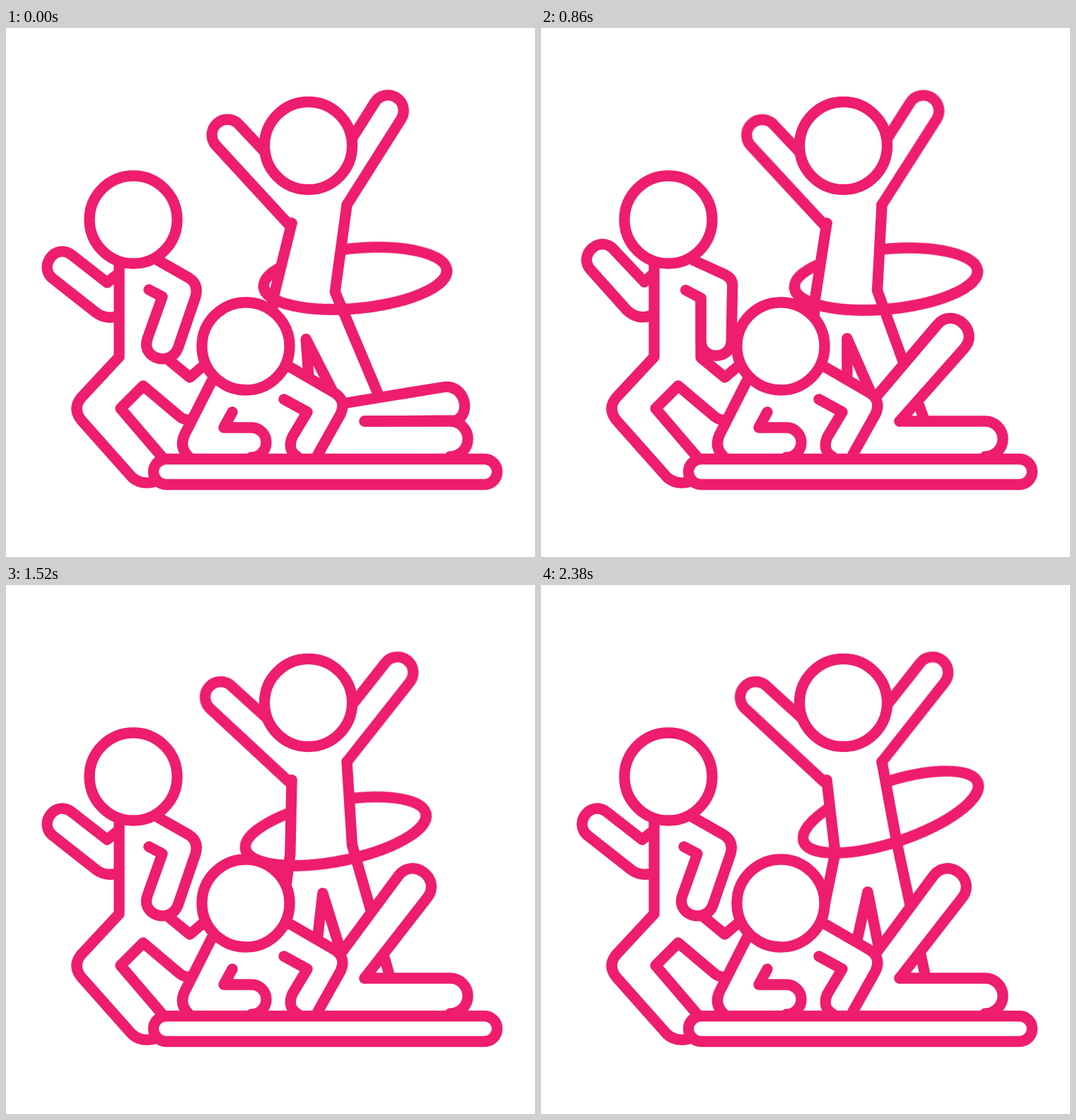
These frames come from a looping animation (748 px wide and 748 px high, 2580 ms). An HTML page without scripts:

```html
<!DOCTYPE html>
<html lang="en">
<head>
<meta charset="utf-8">
<title>Exercise group</title>
<style>
html, body { margin: 0; width: 100%; height: 100%; overflow: hidden; background: #fff; }
svg { display: block; width: 100vw; height: 100vh; }
.line { fill: none; }
.mask { fill: #fff; stroke: none; }
.solid { fill: #fff; }
.move { animation: 2580ms linear infinite; }

.torso { animation-name: torso; }
.hips { animation-name: hips; }
.hoop { animation-name: hoop; }
.arm-left { animation-name: arm-left; transform-origin: 403px 277px; }
.arm-right { animation-name: arm-right; transform-origin: 482px 250px; }
.run-back { animation-name: run-back; }
.run-front { animation-name: run-front; }
.shin { animation-name: shin; }

/* hoop dancer: waist sways, shoulders and feet stay put */
@keyframes torso {
  0%, 31.7% { d: path("M404 276L377 385L465 373L482 250"); }
  11.2%, 40.3% { d: path("M404 276L431 374L519 363L482 250"); }
  51.5% { d: path("M404 276L392 382L480 370L482 250"); animation-timing-function: cubic-bezier(.2, .5, .5, 1); }
  90%, 100% { d: path("M404 276L416 379L503 364L482 250"); }
}
@keyframes hips {
  0%, 31.7% { d: path("M404 276L377 385L378 565M482 250L465 373L546 565M433 565L424 440L488 565"); }
  11.2%, 40.3% { d: path("M404 276L431 374L378 565M482 250L519 363L546 565M433 565L469 434L488 565"); }
  51.5% { d: path("M404 276L392 382L378 565M482 250L480 370L546 565M433 565L438 437L488 565"); animation-timing-function: cubic-bezier(.2, .5, .5, 1); }
  90%, 100% { d: path("M404 276L416 379L378 565M482 250L503 364L546 565M433 565L462 434L488 565"); }
}
@keyframes hoop {
  0%, 32.6% { transform: translate(494px, 354px) rotate(-5.3deg); }
  15.8%, 40.3% { transform: translate(433px, 364.5px) rotate(-5.5deg); }
  51.2% { transform: translate(438.5px, 363px) rotate(-8deg); }
  62.8% { transform: translate(480px, 341px) rotate(-12.5deg); }
  67.4% { transform: translate(486px, 333.5px) rotate(-14.5deg); }
  81.4% { transform: translate(493.5px, 320px) rotate(-18.4deg); }
  92.2%, 100% { transform: translate(494.5px, 321px) rotate(-18.6deg); }
}
@keyframes arm-left {
  0%, 34.1% { transform: none; }
  17.05%, 51.2%, 100% { transform: rotate(-4.5deg); }
}
@keyframes arm-right {
  0%, 34.1% { transform: none; }
  17.05%, 51.2%, 100% { transform: rotate(6deg); }
}

/* runner */
@keyframes run-back {
  0%, 49.6%, 100% { d: path("M158 348L143 360L93 321C70 303 44 338 67 355L128 403Q140 412 157 408"); }
  24.8% { d: path("M158 348L148 359L108 309C91 286 55 311 72 335L117 396Q135 415 157 405"); }
}
@keyframes run-front {
  0%, 49.6%, 100% { d: path("M202 370L221 380L200 439C190 467 232 480 243 453L268 380Q273 362 258 353L214 328"); }
  24.8% { d: path("M206 371L229 383L240 444C245 472 288 465 283 437L272 362Q272 351 262 347L213 327"); }
}

/* leg of the person on the mat */
@keyframes shin {
  0%, .8%, 39.9%, 42.2% { d: path("M476 531L617 508C649 502 659 546 636 555L507 556"); }
  9.3%, 32.75%, 53.5%, 100% { d: path("M475 519L555 411C576 384 617 416 595 443L507 556"); }
  51.2% { d: path("M475 519L551 414C571 387 612 417 592 445L507 556"); }
}
</style>
</head>
<body>
<svg viewBox="0 0 748 748" stroke="#ee1d6e" stroke-width="15.3" stroke-linecap="round" stroke-linejoin="round">
  <g id="dancer">
    <g class="hoop move"><ellipse class="line" rx="130" ry="42.5"/></g>
    <path class="mask torso move" d="M404 276L377 385L465 373L482 250"/>
    <path class="line hips move" d="M404 276L377 385L378 565M482 250L465 373L546 565M433 565L424 440L488 565"/>
    <g class="hoop move"><path class="line" d="M-130 0A130 42.5 0 0 0 130 0"/></g>
    <path class="line arm-left move" d="M376 186L328 135A22 22 0 0 0 296 165L400 278L404 276"/>
    <path class="line arm-right move" d="M478 174L521.3 105.3A22 22 0 0 1 558.7 128.7L482 250"/>
    <circle class="solid" cx="427.5" cy="166.5" r="62"/>
  </g>

  <g id="runner">
    <path class="line" d="M160 333V465L106 523Q94 538 106 554L178 635Q190 646 208 642"/>
    <path class="line" d="M221 607L162 538L194 506L245 549Q252 555 262 554"/>
    <path class="line" d="M226 385V466L260 494L280 477"/>
    <path class="line run-back move" d="M158 348L143 360L93 321C70 303 44 338 67 355L128 403Q140 412 157 408"/>
    <path class="solid run-front move" d="M202 370L221 380L200 439C190 467 232 480 243 453L268 380Q273 362 258 353L214 328"/>
    <circle class="solid" cx="180" cy="271" r="62"/>
  </g>

  <g id="floor">
    <path class="mask" d="M291 499L253 574Q244 592 258 606H628A25 25 0 0 0 628 556H510L480 519L401 479Z"/>
    <path class="solid shin move" d="M476 531L617 508C649 502 659 546 636 555L507 556"/>
    <path class="line" d="M507 556H628A25 25 0 0 1 628 606"/>
    <path class="line" d="M291 499L253 574Q244 592 258 606"/>
    <path class="line" d="M401 479L463 515Q482 526 473 546L441 603"/>
    <path class="line" d="M393 525L426 543L405 578Q397 597 412 606"/>
    <path class="line" d="M320 543L308 565H347A21 21 0 0 1 347 607"/>
    <circle class="solid" cx="339" cy="450" r="62"/>
    <rect class="solid" x="208.5" y="609.5" width="486" height="36" rx="18"/>
  </g>
</svg>
</body>
</html>
```
